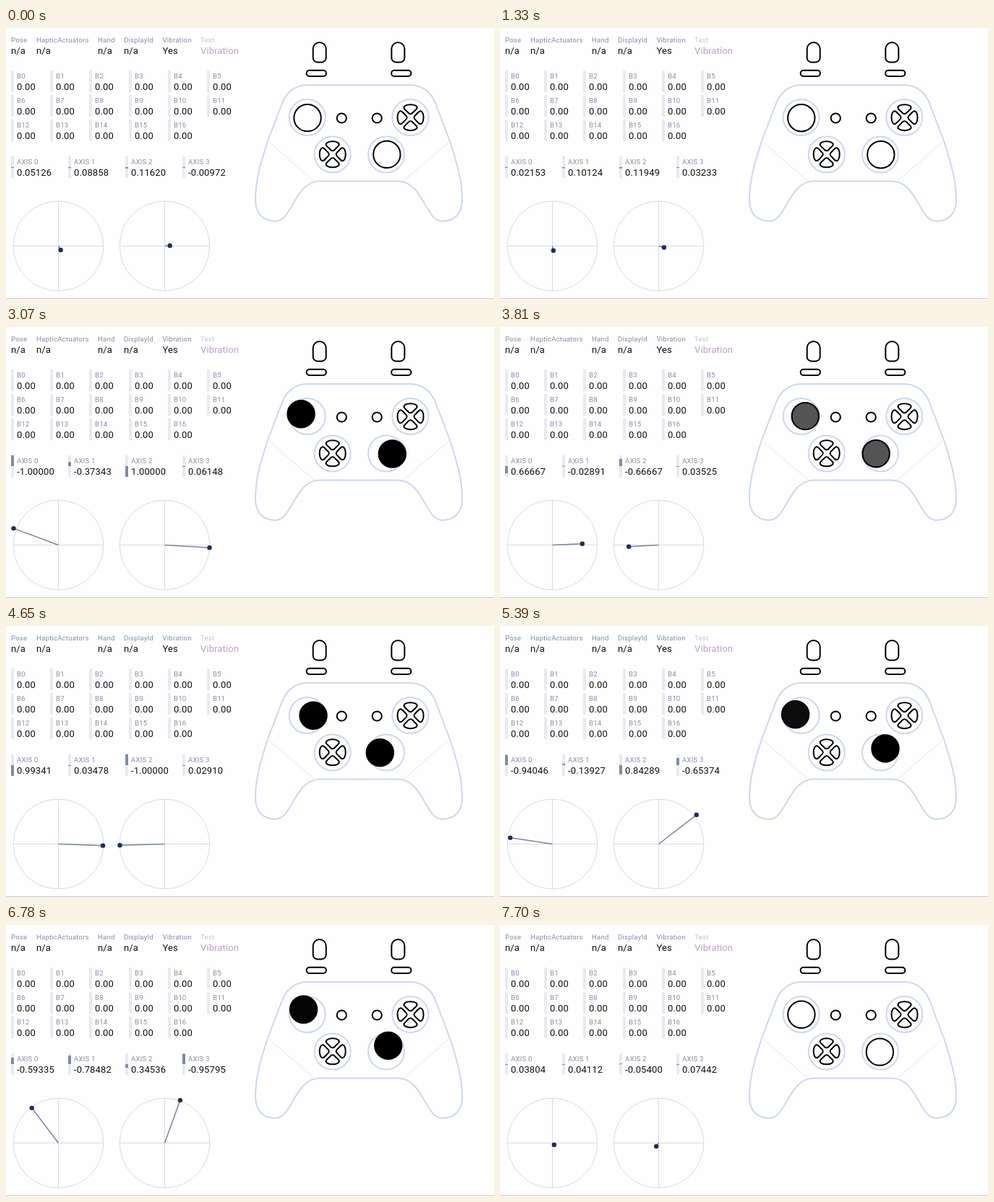
Recreate the animation shown at these times as an HTML page. Size 675 px wide and 376 px high, loop 8000 ms.

```html
<!DOCTYPE html>
<html lang="en">
<head>
<meta charset="utf-8">
<title>Gamepad tester</title>
<style>
  html, body { margin: 0; width: 100%; height: 100%; overflow: hidden; background: #fefefe; }
  svg { display: block; width: 675px; height: 376px; font-family: Roboto, sans-serif; }
  .label { font-size: 9.6px; letter-spacing: .2px; fill: #868ca9; }
  .value { font-size: 13px; letter-spacing: .12px; fill: #111; }
  .track { fill: #e9eaef; }
  .level { fill: #808aa8; }
  .dial { fill: none; stroke: #d9dae4; }
  .ray { stroke: #7a85a4; stroke-width: 1.5; }
  .dot { fill: #1f2c5c; }
  .body { fill: none; stroke: #cdd8ec; stroke-width: 2; }
  .seam { stroke: #eff1f5; stroke-width: 1.5; }
  .part { fill: none; stroke: #000; stroke-width: 2; }
  .stick { fill: #000; stroke: #000; stroke-width: 2; }
</style>
</head>
<body>
<svg id="stage" viewBox="0 0 675 376">
  <defs>
    <path id="petal" d="M0 -18C6 -18 9.5 -15.6 9 -13.2C8.5 -11 4.5 -8.5 3 -6.5C1.5 -4.5 -1.5 -4.5 -3 -6.5C-4.5 -8.5 -8.5 -11 -9 -13.2C-9.5 -15.6 -6 -18 0 -18Z"/>
    <g id="cross">
      <use href="#petal"/>
      <use href="#petal" transform="rotate(90)"/>
      <use href="#petal" transform="rotate(180)"/>
      <use href="#petal" transform="rotate(270)"/>
    </g>
    <g id="half">
      <path class="body" d="M488 79H417C398 79 386 92 381 107L362 157C352 188 345 212 345 238C345 258 356 268 373 268C396 268 399 212.6 434 212.6H488"/>
      <path class="seam" d="M362 157L427 213"/>
      <circle class="body" cx="416.7" cy="124" r="25"/>
      <path class="part" d="M424.7 29a9 9 0 0 1 18 0v12.4a6 6 0 0 1 -6 6h-6a6 6 0 0 1 -6 -6z"/>
      <rect class="part" x="415.7" y="58.8" width="27.2" height="8.2" rx="4"/>
    </g>
  </defs>
  <use href="#half"/>
  <use href="#half" transform="matrix(-1 0 0 1 976 0)"/>
  <circle class="part" cx="464.3" cy="125" r="6.6"/>
  <circle class="part" cx="513.2" cy="125" r="6.6"/>
  <circle class="body" cx="451.7" cy="175.5" r="25"/>
  <circle class="body" cx="526" cy="175.5" r="25"/>
  <use href="#cross" class="part" transform="translate(451.7 175.3)"/>
  <use href="#cross" class="part" transform="translate(559.5 124.2)"/>
  <rect y="375" width="675" height="1" fill="#cbcbcb"/>
</svg>
<script>
const stage = document.getElementById('stage');

function add(tag, attrs, text = '') {
  const el = document.createElementNS('http://www.w3.org/2000/svg', tag);
  set(el, attrs);
  el.textContent = text;
  return stage.appendChild(el);
}
function set(el, attrs) {
  for (const k in attrs) el.setAttribute(k, attrs[k]);
}
function field(x, y, label, value) {
  return [add('text', { class: 'label', x, y }, label),
          add('text', { class: 'value', x, y: y + 16 }, value)];
}
function meter(x, y, label, value) {
  add('rect', { class: 'track', x, y, width: 4, height: 30 });
  return field(x + 8, y + 11, label, value)[1];
}

[[7, 'Pose', 'n/a'], [42, 'HapticActuators', 'n/a'], [127, 'Hand', 'n/a'],
 [163, 'DisplayId', 'n/a'], [216.5, 'Vibration', 'Yes']].forEach(([x, a, b]) => field(x, 20, a, b));
const [test, buzz] = field(269, 20, 'Test', 'Vibration');
test.style.fill = '#c3c4d2';
buzz.style.fill = '#c0a0cc';

for (let i = 0; i < 17; i++)
  meter(7 + Math.round((i % 6) * 54.2), 59 + Math.floor(i / 6) * 34, 'B' + i, '0.00');

const axes = [0, 1, 2, 3].map(i => {
  const x = 7 + i * 79;
  return { text: meter(x, 178, 'AXIS ' + i, ''), level: add('rect', { class: 'level', x, width: 4 }) };
});

const sticks = [[72.5, 416.6, 123.9], [219.5, 525.8, 175.5]].map(([cx, sx, sy]) => {
  const cy = 302.5, r = 62.3;
  add('circle', { class: 'dial', cx, cy, r });
  add('path', { class: 'dial', d: `M${cx - r} ${cy}h${2 * r}M${cx} ${cy - r}v${2 * r}` });
  return { cx, cy, sx, sy,
    ray: add('line', { class: 'ray', x1: cx, y1: cy }),
    dot: add('circle', { class: 'dot', r: 3.2 }),
    cap: add('circle', { class: 'stick', r: 18.7 }) };
});

const POLL = 82.68, LOOP = 8000, TURN = 2 * Math.PI;
const SPIN_FROM = 65, SPIN_SPAN = 17, SPIN_TO = 91;
const clamp = v => Math.max(-1, Math.min(1, v));
const mix = (a, b, u) => a + (b - a) * u;

// A pose is left x, left y, right x, right y; the sticks mirror each other
const vertical = s => [.04, s, .06, -s];
const sideways = s => [s, .04, -s, .03];
const idle = [.05126, .08858, .1162, -.00972];
const apart = [-1, -.37343, 1, .06148];
const spinA = [-.94046, -.13927, .84289, -.65374];
const spinB = [-.59335, -.78482, .34536, -.95795];

// One full turn and the rest of the way from a to b while u runs from 0 to 1
function orbit(i, dir, u) {
  const polar = p => [Math.atan2(p[i + 1], p[i]), Math.hypot(p[i], p[i + 1])];
  const [a, ra] = polar(spinA), [b, rb] = polar(spinB);
  const rest = ((b - a) * dir + TURN) % TURN;
  const angle = a + dir * (TURN + rest) * u, r = mix(ra, rb, u);
  return [clamp(r * Math.cos(angle)), clamp(r * Math.sin(angle))];
}
function spin(n) {
  const u = (n - SPIN_FROM) / SPIN_SPAN;
  return [...orbit(0, 1, u), ...orbit(2, -1, u)];
}

// Poll number and pose: push up and down, swing sideways, spin, let go
const keys = [
  [0, idle], [2, idle],
  [4, vertical(-1)], [13, vertical(-1)],
  [16, [.02153, .10124, .11949, .03233]],
  [19, vertical(1)], [21, vertical(1)],
  [26, vertical(-1)], [30, vertical(0)],
  [35, apart], [41, apart],
  [47, sideways(1)], [56, [.99341, .03478, -1, .0291]],
  [63, sideways(-1)], [SPIN_FROM, spinA],
  [SPIN_TO, spin(SPIN_TO)], [93, [.03804, .04112, -.054, .07442]]
];

function pose(n) {
  if (n >= SPIN_FROM && n <= SPIN_TO) return spin(n);
  const i = keys.findIndex(k => k[0] > n);
  if (i < 0) return keys[keys.length - 1][1];
  const [na, a] = keys[i - 1], [nb, b] = keys[i];
  return a.map((v, j) => mix(v, b[j], (n - na) / (nb - na)));
}

function draw(p) {
  axes.forEach((a, i) => {
    const h = p[i] * 15;
    a.text.textContent = p[i].toFixed(5);
    set(a.level, { y: 193 + Math.min(h, 0), height: Math.max(1, Math.abs(h)) });
  });
  sticks.forEach((s, i) => {
    const x = p[2 * i], y = p[2 * i + 1], m = Math.hypot(x, y);
    const px = s.cx + x * 62, py = s.cy + y * 62;
    set(s.ray, { x2: px, y2: py });
    set(s.dot, { cx: px, cy: py });
    set(s.cap, { cx: s.sx + x * 8.5, cy: s.sy + y * 8.5, 'fill-opacity': m < .15 ? 0 : Math.min(1, m) });
  });
}

const start = performance.now();
let shown = -1;
function frame() {
  const n = Math.floor((performance.now() - start) % LOOP / POLL);
  if (n !== shown) draw(pose(shown = n));
  requestAnimationFrame(frame);
}
frame();
</script>
</body>
</html>
```
